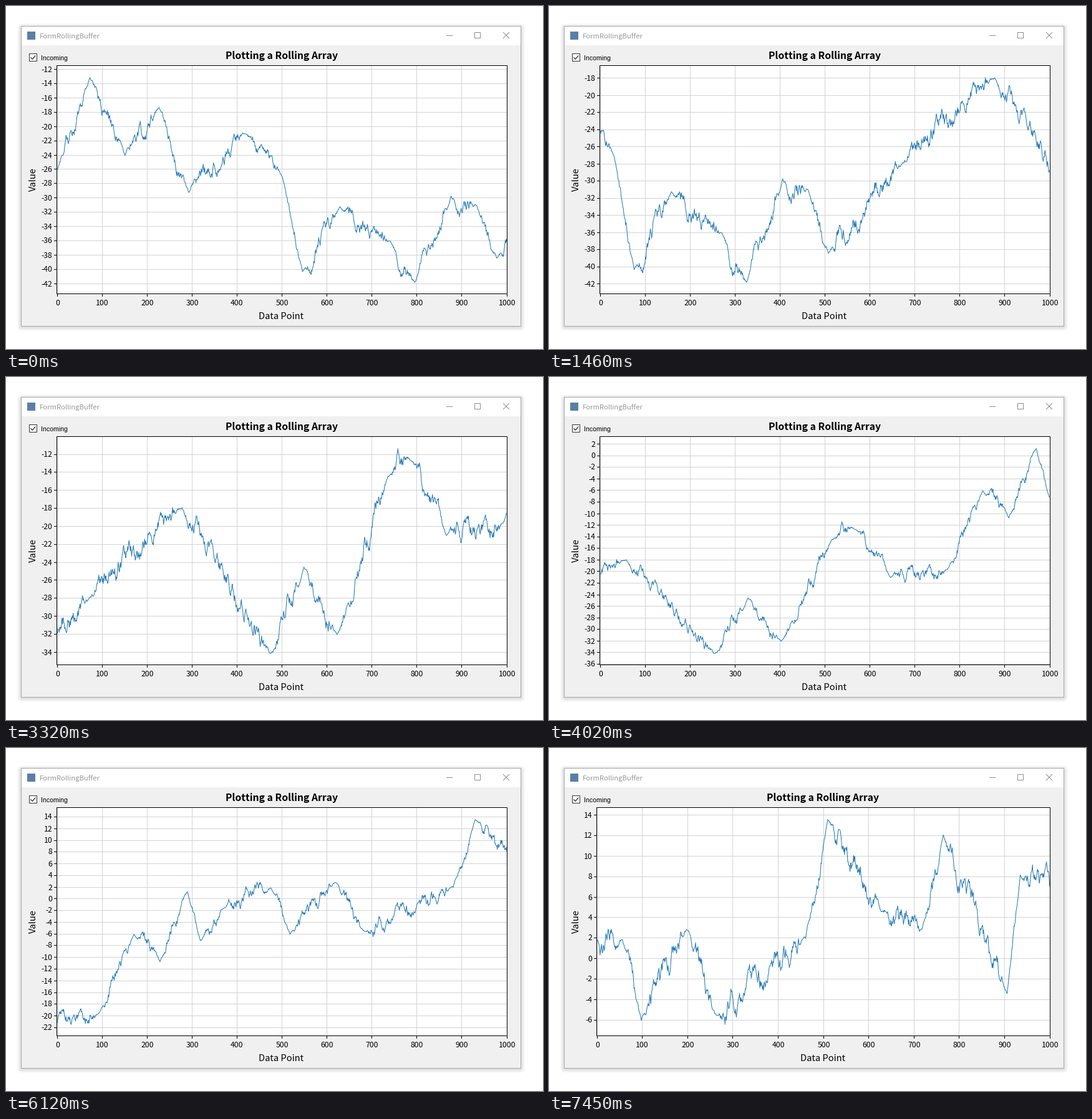
Recreate the animation shown at these times as a matplotlib script. Size 861 by 550 pixels, loop 7520 ms.

```python
import matplotlib.pyplot as plt
import numpy as np
from matplotlib.animation import FuncAnimation
from matplotlib.patches import FancyBboxPatch, Rectangle

W, H, DPI = 861, 550, 64
PT = 72 / DPI                      # points per pixel
LOOP, STEP, REPAINTS = 7520, 20, 97
TOP, BOTTOM, RIGHT = 95.5, 461.5, 803.5
POINTS = 1000
SANS = ["Noto Sans CJK JP", "Liberation Sans"]

plt.rcParams["path.snap"] = False

# Main turning points of the signal: (sample, value)
TURNS = [
    (0, -26), (72, -13.1), (150, -24), (226, -17.3), (292, -29.2),
    (418, -21), (500, -27), (545, -40.3), (628, -31.2), (740, -36),
    (795, -41.8), (875, -29.7), (932, -31), (977, -38.4), (1140, -28),
    (1347, -17.9), (1544, -34.1), (1618, -24.5), (1692, -32), (1805, -14.4),
    (1857, -12.7), (1935, -21), (2062, -19.5), (2140, -6), (2198, -10.7),
    (2259, 1.3), (2288, -7.1), (2340, -1.5), (2445, 1.9), (2487, -6),
    (2590, 2.8), (2653, -5.5), (2850, 2), (2899, 13.6), (3017, 4.6),
    (3107, 2.9), (3154, 12.1), (3295, -3.4), (3324, 8.2), (3400, 6),
]


def make_signal():
    """Lines between turning points plus short-memory noise, calm at turns."""
    at, value = np.array(TURNS).T
    n = np.arange(int(at[-1]) + 1)
    steps = np.random.default_rng(7).uniform(-0.65, 0.65, n.size)
    noise = np.convolve(steps, np.exp(-np.arange(80) / 12))[:n.size]
    distance = np.abs(n[:, None] - at).min(axis=1)
    return np.interp(n, at, value) + noise * np.minimum(distance / 20, 1)


signal = make_signal()


def offset_at(i):
    """Samples received by the latest repaint; they come in tens."""
    repaint = ((i + 1) * STEP - 1) * REPAINTS // LOOP
    return round(2.49 * repaint) * 10


fig = plt.figure(figsize=(W / DPI, H / DPI), dpi=DPI, facecolor="white")
ax = fig.add_axes([0, 0, 1, 1])
ax.set_xlim(0, W)
ax.set_ylim(H, 0)
ax.axis("off")


def stroke(xs=(), ys=(), color="black", width=1, **kw):
    return ax.plot(xs, ys, color=color, lw=width * PT,
                   solid_capstyle="butt", **kw)[0]


def box(x, y, w, h, face="none", edge="none", z=1):
    patch = Rectangle((x, y), w, h, fc=face, ec=edge, lw=PT, zorder=z)
    return ax.add_patch(patch)


def label(x, y, text, px, ha="center", color="black", font=SANS, **kw):
    return ax.text(x, y, text, fontsize=px * PT, ha=ha, va="baseline",
                   color=color, family=font, **kw)


def segments(starts, ends):
    """Join separate segments into one broken line."""
    gap = np.full(len(starts), np.nan)
    return np.column_stack([starts, ends, gap]).ravel()


def crisp(v):
    return np.floor(v) + 0.5


def draw_window():
    for pad in range(1, 9):
        ax.add_patch(FancyBboxPatch((26, 36), 798, 477, fc="black", ec="none",
                                    boxstyle=f"round,pad={pad}",
                                    alpha=0.018, zorder=0))
    box(24.5, 32.5, 801, 481, "#f0f0f0", "#a8a8a8")
    box(25, 33, 800, 30, "white")
    box(34, 41, 13, 13, "#5a7fa6")
    label(54, 52, "FormRollingBuffer", 11.3, "left", "#999999")

    gray = "#8c8c8c"
    stroke([706, 716], [47.5, 47.5], gray)
    box(751.5, 42.5, 9, 9, edge=gray)
    stroke([797, 807], [42, 52], gray)
    stroke([797, 807], [52, 42], gray)

    box(37.5, 76.5, 12, 12, "white", "#333333")
    stroke([39.5, 42.3, 47.2], [82.3, 85.3, 79.5], "#222222", 1.2)
    label(56, 87, "Incoming", 10.5, "left", font=["Liberation Sans"])


draw_window()
face = box(0, TOP, 1, BOTTOM - TOP, "white")
grid = stroke(color="#d3d3d3", zorder=2)
trace = stroke(color="#1f77b4", zorder=3, solid_joinstyle="round")
marks = stroke(zorder=4)
frame = box(0, TOP, 1, BOTTOM - TOP, edge="black", z=5)
title = label(0, 85, "Plotting a Rolling Array", 15.7, weight="bold")
x_name = label(0, 502, "Data Point", 14.6)
label(47.5, 278, "Value", 14.6, rotation=90, rotation_mode="anchor")
x_labels = [label(0, 480, str(100 * k), 12.2) for k in range(11)]
y_labels = [label(0, 0, "", 12.2, "right") for _ in range(28)]


def update(i):
    start = offset_at(i)
    data = signal[start:start + POINTS]

    # Vertical autoscale leaves a tenth of the height free
    mid = (data.max() + data.min()) / 2
    half = (data.max() - data.min()) / 1.8
    lo, hi = mid - half, mid + half
    ticks = np.arange(np.ceil(lo / 2) * 2, hi, 2)
    left = 81.5 if ticks[0] <= -10 else 76.5

    # The plot area lies just inside the frame
    def to_x(v):
        return left + 0.5 + v / POINTS * (RIGHT - left - 1)

    def to_y(v):
        return TOP + 0.5 + (hi - v) / (hi - lo) * (BOTTOM - TOP - 1)

    gx = crisp(to_x(np.arange(11) * 100))
    gy = crisp(to_y(ticks))
    nx, ny = np.ones_like(gx), np.ones_like(gy)

    grid.set_data(
        np.append(segments(gx, gx), segments(left * ny, RIGHT * ny)),
        np.append(segments(TOP * nx, BOTTOM * nx), segments(gy, gy)))
    marks.set_data(
        np.append(segments(gx, gx), segments((left - 4.5) * ny, left * ny)),
        np.append(segments(BOTTOM * nx, (BOTTOM + 4.5) * nx),
                  segments(gy, gy)))
    trace.set_data(to_x(np.arange(POINTS)) + 0.5, to_y(data) + 0.5)

    for patch in (face, frame):
        patch.set_x(left)
        patch.set_width(RIGHT - left)
    for text in (title, x_name):
        text.set_x((left + RIGHT) / 2 - 1)
    for text, x in zip(x_labels, gx):
        text.set_x(x)
    for k, text in enumerate(y_labels):
        shown = k < len(ticks)
        text.set_visible(shown)
        if shown:
            text.set_text(f"{int(ticks[k])}")
            text.set_position((left - 7, gy[k] + 4))
    return []


anim = FuncAnimation(fig, update, frames=LOOP // STEP, interval=STEP,
                     repeat=True, repeat_delay=0, cache_frame_data=False)
plt.show()
```
